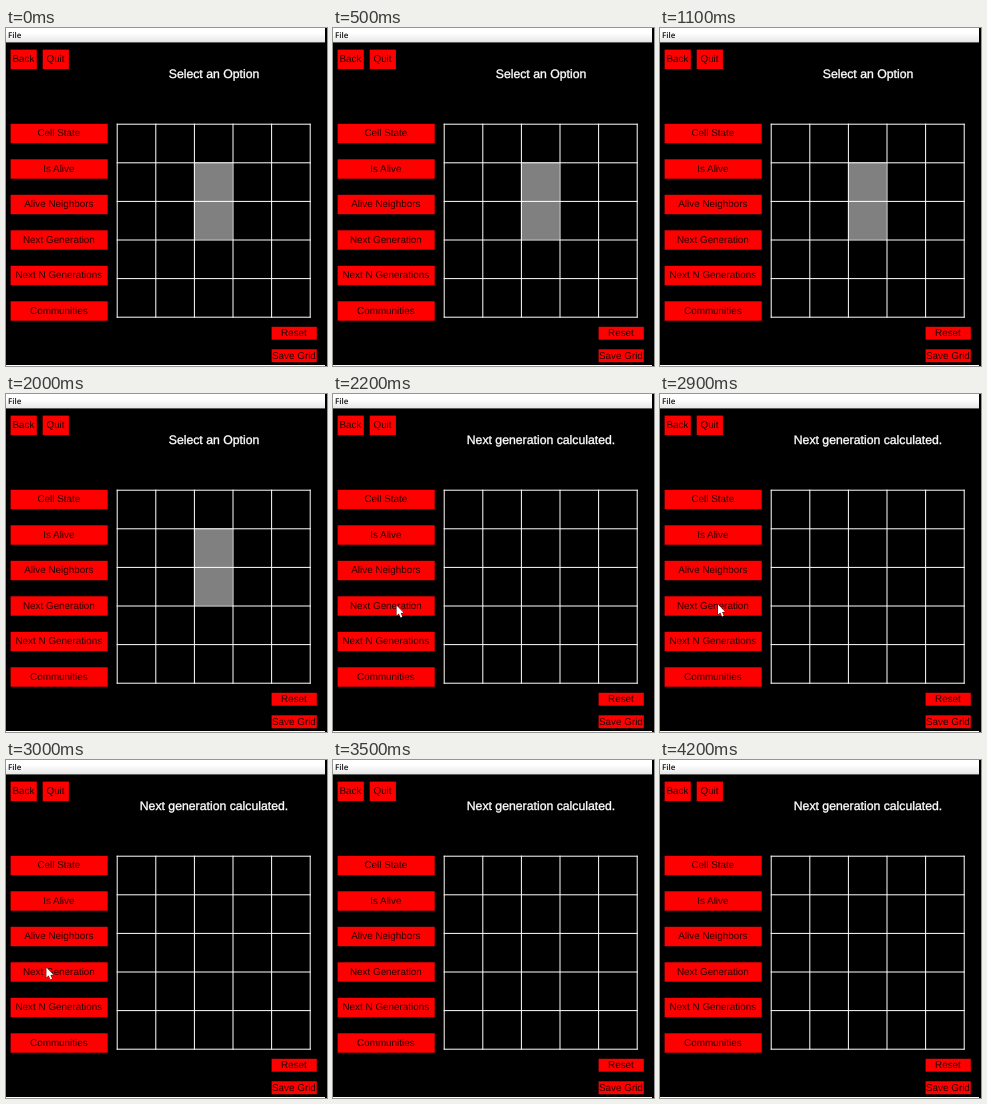
These frames come from a looping animation (321x338 px, 4.4 s). An HTML page with a canvas:

```html
<!DOCTYPE html>
<html lang="en">
<head>
<meta charset="utf-8">
<title>Select an Option</title>
<style>
html, body { margin: 0; width: 100%; height: 100%; overflow: hidden; background: #000; }
canvas { display: block; }
</style>
</head>
<body>
<canvas id="stage" width="321" height="338"></canvas>
<script>
const ctx = document.getElementById('stage').getContext('2d');
const LOOP = 4400, CALCULATED = 2200;
const GRID = { x: 110.7, y: 95.7, cell: 38.6, count: 5 };
const SANS = '"Liberation Sans", Arial, sans-serif';
const MENU = ['Cell State', 'Is Alive', 'Alive Neighbors',
  'Next Generation', 'Next N Generations', 'Communities'];

// The pointer jumps between captured positions: [start, x, y]
const POINTER = [[2200, 63.6, 211.6], [2900, 58, 210.6], [3000, 40.4, 207.5]];
const POINTER_END = 3100;

const menuShade = ctx.createLinearGradient(0, 5, 0, 15);
menuShade.addColorStop(0, '#fff');
menuShade.addColorStop(1, '#e4e4e4');

function rect(x, y, w, h, color) {
  ctx.fillStyle = color;
  ctx.fillRect(x, y, w, h);
}

function label(text, x, y, font, color, align = 'center') {
  ctx.font = font;
  ctx.textRendering = 'geometricPrecision';
  ctx.textAlign = align;
  ctx.fillStyle = color;
  ctx.fillText(text, x, y);
}

function button(text, x, y, w, h, baseline) {
  rect(x, y, w, h, '#f00');
  label(text, x + w / 2 - 0.3, baseline, `9.9px ${SANS}`, '#200');
}

function title(text) {
  label(text, 208, 50.2, `12.25px ${SANS}`, '#fff');
  ctx.lineWidth = 0.35;
  ctx.strokeStyle = '#fff';
  ctx.strokeText(text, 208, 50.2);
}

function drawGrid(alive) {
  const { x, y, cell, count } = GRID;
  const size = cell * count + 1;
  if (alive) rect(x + cell * 2, y + cell, cell, cell * 2, '#808080');
  for (let i = 0; i <= count; i++) {
    rect(x + i * cell, y, 1, size, '#fff');
    rect(x, y + i * cell, size, 1, '#fff');
  }
}

function drawPointer(x, y) {
  ctx.save();
  ctx.translate(x, y);
  ctx.beginPath();
  ctx.moveTo(0, 0);
  for (const [px, py] of [[0, 10], [2.3, 8], [4, 12], [5.7, 11.2], [4.1, 7.4], [7, 7.2]]) {
    ctx.lineTo(px, py);
  }
  ctx.closePath();
  ctx.lineWidth = 0.8;
  ctx.strokeStyle = '#400';
  ctx.stroke();
  ctx.fillStyle = '#fff';
  ctx.fill();
  ctx.restore();
}

function draw(t) {
  const done = t >= CALCULATED;
  rect(0, 0, 321, 338, '#000');
  rect(0, 0, 319, 14.4, menuShade);
  rect(0, 337, 319, 1, '#fff');
  label('File', 2, 9.7, '600 8px "Open Sans", sans-serif', '#111', 'left');

  button('Back', 4.6, 21.6, 26.2, 19.5, 34);
  button('Quit', 36.7, 21.6, 26.2, 19.5, 34);
  MENU.forEach((text, i) => {
    const y = 95.8 + i * 35.5;
    button(text, 4.6, y, 97.1, 19.4, y + 12.2);
  });
  button('Reset', 265.6, 298.8, 45.2, 12.9, 308);
  button('Save Grid', 265.6, 321.3, 45.2, 12.9, 330.8);

  title(done ? 'Next generation calculated.' : 'Select an Option');
  drawGrid(!done);

  if (done && t < POINTER_END) {
    const [, x, y] = POINTER.filter(p => p[0] <= t).pop();
    drawPointer(x, y);
  }
}

const start = performance.now();
function tick() {
  draw((performance.now() - start) % LOOP);
  requestAnimationFrame(tick);
}
tick();
</script>
</body>
</html>
```
